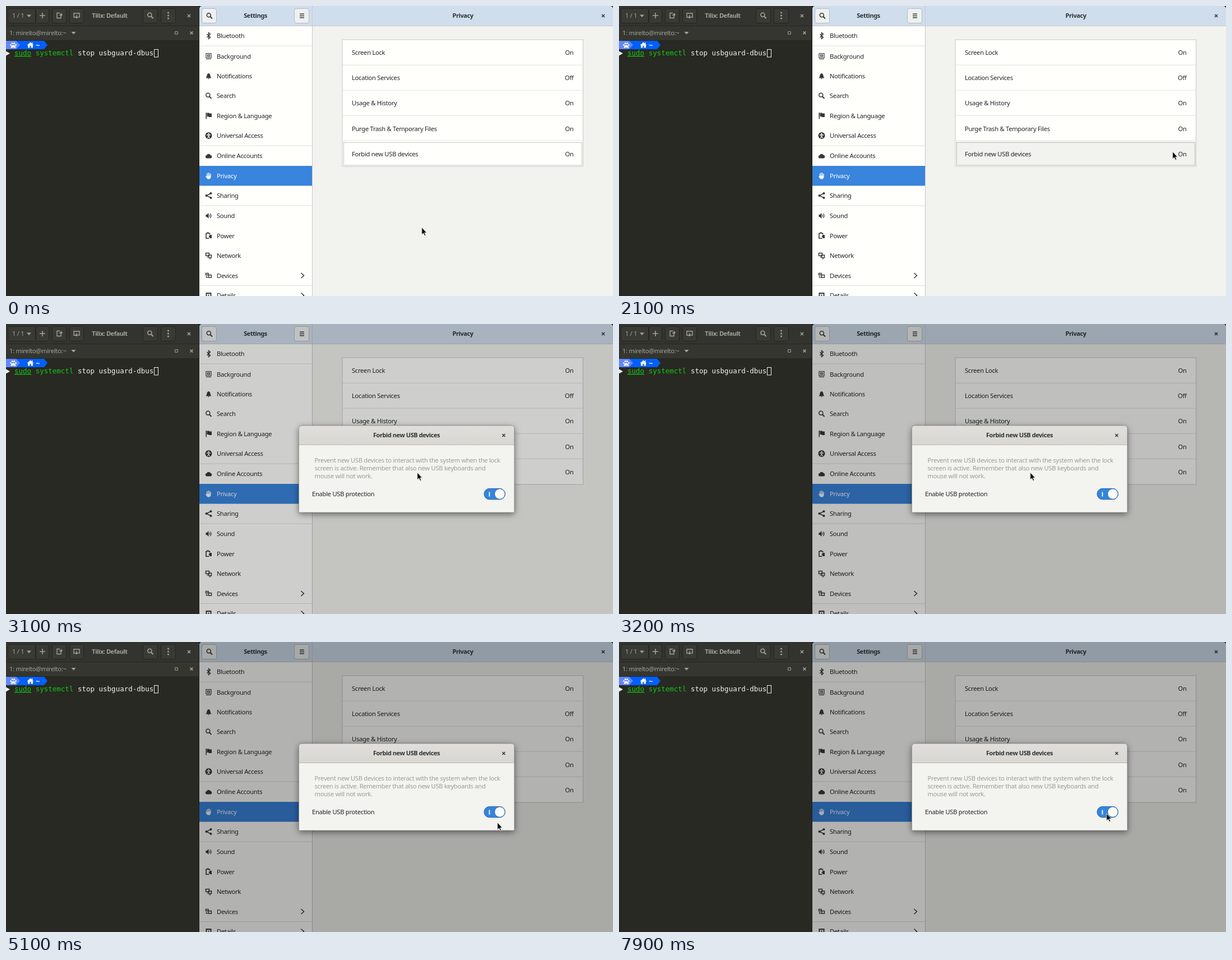
Animation of 1083 by 517 pixels, one loop 8000 ms. Source, as an HTML page:

```html
<!DOCTYPE html>
<html lang="en">
<head>
<meta charset="utf-8">
<title>USB protection settings</title>
<style>
  html, body { margin: 0; width: 100%; height: 100%; overflow: hidden; background: #282923; }
  svg { display: block; width: 100vw; height: 100vh; }
  text { font: 11.2px "Noto Sans", "Open Sans", sans-serif; letter-spacing: -.28px; fill: #222628; white-space: pre; }
  .title { font-weight: 700; font-size: 11px; letter-spacing: -.45px; text-anchor: middle; fill: #2e3436; }
  .end { text-anchor: end; }
  .dim { fill: #9b9d99; }
  .mono { font: 12.5px "DejaVu Sans Mono", monospace; letter-spacing: 0; fill: #f3f3ec; }
  .dark text { fill: #a3a39c; }
  .dark rect { fill: #3a3a35; stroke: #242420; }
  .ico { fill: currentColor; color: #343a3b; }
  .ln { fill: none; stroke: currentColor; stroke-width: 1.6; }
</style>
</head>
<body>
<svg viewBox="0 0 1083 517">
  <defs>
    <linearGradient id="bar" x2="0" y2="1"><stop stop-color="#e1dfdb"/><stop offset="1" stop-color="#d8d6d1"/></linearGradient>
    <filter id="shadow" x="-10%" y="-20%" width="120%" height="145%">
      <feDropShadow dx="0" dy="3" stdDeviation="6" flood-opacity=".5"/>
    </filter>
  </defs>

  <!-- terminal -->
  <rect width="345" height="517" fill="#282923"/>
  <rect width="345" height="35" fill="#33342f"/>
  <rect y="35" width="345" height="27" fill="#353630"/>
  <path d="M0 35.5H345M0 61.5H345" stroke="#262722"/>
  <g class="dark" id="termBar"></g>
  <path d="M18 62H68L74 69.5 68 77H18Z" fill="#005fff"/>
  <path d="M0 62H18L25 69.5 18 77H0Z" fill="#5f87ff"/>
  <g fill="#f3f3ec">
    <path d="M8.5 74.5C8.500 71 11 69.500 13 69.500S17.500 71 17.500 74.500C16 75.500 14.500 74 13 74S10 75.500 8.500 74.500Z"/>
    <circle cx="8.500" cy="69.500" r="1.500"/><circle cx="11.300" cy="66.500" r="1.600"/>
    <circle cx="14.800" cy="66.500" r="1.600"/><circle cx="17.500" cy="69.500" r="1.500"/>
    <path d="M37.500 70 43.500 64.500 46 66.800V65H47.500V68.200L49.500 70H48V74.500H44.500V71H42.500V74.500H39V70Z"/>
    <path d="M0 80.500 7 84.500 0 88.500Z"/>
  </g>
  <text class="mono" x="53" y="74" font-weight="700" style="font-weight:700">~</text>
  <text class="mono" x="15" y="88"><tspan fill="#14c714" text-decoration="underline">sudo</tspan><tspan fill="#14c714"> systemctl</tspan> stop usbguard-dbus</text>
  <rect x="264.500" y="77.500" width="7" height="13.500" fill="none" stroke="#f3f3ec"/>

  <!-- settings window -->
  <path d="M344 517V0H1083V517Z" fill="#1f201c"/>
  <path id="windowShape" d="M345 517V6Q345 0 351 0H1077Q1083 0 1083 6V517Z" fill="#f2f2ee"/>
  <path d="M345 35V6Q345 0 351 0H1077Q1083 0 1083 6V35Z" fill="#d0ddec"/>
  <rect x="345" y="36" width="201" height="481" fill="#fffffc"/>
  <path d="M345 35.500H1083M546.500 0V517" stroke="#c6c8c8"/>
  <g fill="#eff1f0" stroke="#b4b9bd">
    <rect x="349.500" y="4.500" width="26" height="26" rx="3.500"/>
    <rect x="514.500" y="4.500" width="26" height="26" rx="3.500"/>
  </g>
  <g id="windowBar"></g>
  <g id="sidebar"></g>
  <rect x="600" y="60" width="429.500" height="226" fill="#fffffc" stroke="#cbc8c3"/>
  <rect id="hover" x="600.500" y="241" width="428.500" height="44.500" fill="#f2f2ee"/>
  <g id="panel"></g>
  <rect id="focus" x="602.500" y="243.500" width="425" height="40.500" fill="none" stroke="#8b8e8c" stroke-dasharray="1 1"/>
  <path id="shade" d="M345 517V6Q345 0 351 0H1077Q1083 0 1083 6V517Z"/>

  <!-- dialog -->
  <g id="dialog">
    <path d="M522.500 336V187Q522.500 181 528.500 181H901Q907 181 907 187V336Z" fill="#f3f3ef" filter="url(#shadow)"/>
    <path d="M522.500 216V187Q522.500 181 528.500 181H901Q907 181 907 187V216Z" fill="url(#bar)"/>
    <path d="M522.500 215.500H907" stroke="#bdb8b2"/>
    <path d="M522.500 336V187Q522.500 181 528.500 181H901Q907 181 907 187V336Z" fill="none" stroke="#6e6e6a" stroke-width=".6"/>
    <g id="dialogText"></g>
    <rect id="track" x="853" y="293.300" width="37.500" height="19.500" rx="9.750"/>
    <path id="markOn" d="M862.500 299.500V307.500" stroke="#fff" stroke-width="1.800"/>
    <circle id="markOff" cx="880.700" cy="303.200" r="2.600" fill="none" stroke="#3a3f40" stroke-width="1.400"/>
    <circle id="knob" cy="303" r="9.300" fill="#fbfbf8"/>
  </g>
  <path id="pointer" d="M.8.8V13.600L3.700 11 5.900 15.600 7.900 14.700 5.800 10.200H9.600Z" fill="#0c0c0c" stroke="#f4f4f0" stroke-width=".8"/>
</svg>

<script>
const $ = id => document.getElementById(id);
const text = (x, y, str, cls = '') => `<text x="${x}" y="${y}" class="${cls}">${str}</text>`;
const icon = (x, y, body, color = '#343a3b') =>
  `<g class="ico" style="color:${color}" transform="translate(${x} ${y})">${body}</g>`;
const line = (d, width = 1.6) => `<path class="ln" d="${d}" style="stroke-width:${width}"/>`;
const solid = d => `<path d="${d}"/>`;
const dot = (x, y, r) => `<circle cx="${x}" cy="${y}" r="${r}"/>`;

const cross = line('M-2.500-2.500 2.500 2.500M2.500-2.500-2.500 2.500');
const lens = '<circle class="ln" cx="-1.200" cy="-1.200" r="3.500"/>' + line('M1.500 1.500 5 5', 2);
const caret = solid('M-4-2H4L0 2.500Z');
const chevron = line('M-2.500-4.500 2.500 0-2.500 4.500', 1.5);

// Terminal header
const gray = '#a3a39c';
const termButton = (x, w) => `<rect x="${x}.5" y="4.500" width="${w}" height="26" rx="3"/>`;
$('termBar').innerHTML =
  [[3, 49], [53, 23], [82, 25], [113, 25], [244, 26], [276, 26]].map(b => termButton(...b)).join('') +
  text(11, 21, '1 / 1') + icon(41, 17.5, caret, gray) +
  icon(65, 17, line('M-5 0H5M0-5V5'), gray) +
  icon(95, 17, line('M1-4.500H-4V4.500H3V1M0-1H4', 1.4) + solid('M2.500-5 6-1.500 2.500 2Z'), gray) +
  icon(126, 17, line('M-2 3H-5V-4H5V3H3', 1.4) + solid('M-3 2H3L0 5.500Z') + line('M0-1V3', 1.4), gray) +
  text(185, 21, 'Tilix: Default', 'title') +
  icon(257.500, 17, lens, gray) +
  icon(289.500, 17, dot(0, -5, 1.5) + dot(0, 0, 1.5) + dot(0, 5, 1.5), gray) +
  icon(326.500, 17.500, cross, gray) +
  text(6, 52, '1: mirelto@mirelto:~') + icon(120.500, 48, caret, gray) +
  icon(304, 48, line('M-2.300-2.300H2.300V2.300H-2.300Z', 1), gray) + icon(331, 48, cross, gray);

// Settings header
$('windowBar').innerHTML =
  icon(363, 17.500, lens) + icon(528, 17.500, line('M-4-3.200H4M0 0M-4 0H4M-4 3.200H4', 1.5)) +
  text(445, 21, 'Settings', 'title') + text(815, 21, 'Privacy', 'title') + icon(1065.500, 17.500, cross);

// Sidebar
const screens = line('M-5-4.500H1V0H-5ZM-3 2.500H-1', 1.5) + line('M0-1H5V3.500H0Z', 1.5) + line('M1 5.500H4', 1.3);
const rows = [
  ['Bluetooth', 53, line('M-3-3 3 3 0 5.500V-5.500L3-3-3 3', 1.4)],
  ['Background', 89.5, line('M-4.500-5H4.500V3H-4.500ZM-4.500 5H4.500', 1.2) + line('M-2 1V-3H2V1ZM-2-1H2', 1)],
  ['Notifications', 125, solid('M-5 3.500C-2.500 1.500-4-4 0-5 4-4 2.500 1.500 5 3.500ZM-1.500 4H1.500L0 5.500Z')],
  ['Search', 160, lens],
  ['Region &amp; Language', 195.5, solid('M-5-5.500H-3.500V6H-5ZM-3-5H1V-4H5.500V2.500H0V1.500H-3Z')],
  ['Universal Access', 231, dot(0, 0, 6) +
    '<g style="color:#fffffc"><circle cy="-3.300" r="1.200"/>' + line('M-3.500-1H3.500M0-1V1.500M-2 4.500 0 1 2 4.500', 1.3) + '</g>'],
  ['Online Accounts', 267, solid('M-3.500 4.500A2.800 2.800 0 0 1-3.500-1A4 4 0 0 1 3.500-1.200A2.900 2.900 0 0 1 3.500 4.500Z')],
  ['Privacy', 302.5, solid('M-3.500 0H4V3.500L2 6H-2L-5.500 1.500-4.500.500-3.500 1.500Z') + line('M-3-4V1M-.800-5.500V1M1.400-5V1M3.500-3.500V1', 1.3)],
  ['Sharing', 338, dot(-4, 0, 2) + dot(4, -4, 2) + dot(4, 4, 2) + line('M4-4-4 0 4 4', 1.4)],
  ['Sound', 374, solid('M-5-2H-3L0-5V5L-3 2H-5Z') + line('M1.500-2Q3 0 1.500 2M3-4Q6 0 3 4', 1.2)],
  ['Power', 409.5, line('M1 4.800H-4.500V-4H-2.500V-5.200H0V-4H2V-2', 1.6) + solid('M0 1 2.500-1.500H5.500V4.500H2.500Z')],
  ['Network', 445, screens],
  ['Devices', 480.5, line('M-5-4H-.500V-1H-5Z', 1.5) + line('M0-1H5V3.500H0ZM-4 1V3H-1', 1.4), true],
  ['Details', 516, line('M-4-4H4V4H-4Z', 2) + line('M0-2V3', 1.5), true]
];
$('sidebar').innerHTML =
  '<path d="M345 71H546M345 249H546M345 356H546M345 498.500H546" stroke="#deded9"/>' +
  '<rect x="345" y="285" width="201" height="35.500" fill="#3984dc"/>' +
  rows.map(([name, y, body, more]) => {
    const active = name === 'Privacy';
    const label = text(376, y + 4, name);
    return icon(361.5, y, body, active ? '#f4f8fc' : undefined) +
      (active ? label.replace('<text', '<text style="fill:#fff"') : label) +
      (more ? icon(529, y, chevron) : '');
  }).join('');

// Privacy list
const options = [['Screen Lock', 'On'], ['Location Services', 'Off'], ['Usage &amp; History', 'On'],
  ['Purge Trash &amp; Temporary Files', 'On'], ['Forbid new USB devices', 'On']];
$('panel').innerHTML = options.map(([name, value], i) => {
  const y = 87 + 45.2 * i;
  return (i ? `<path d="M600 ${60.2 + 45 * i}H1029" stroke="#e0e0db"/>` : '') +
    text(617, y, name) + text(1012.7, y, value, 'end');
}).join('');
const usbState = $('panel').lastElementChild;

$('dialogText').innerHTML =
  text(714.5, 202, 'Forbid new USB devices', 'title') + icon(888, 198.500, cross) +
  ['Prevent new USB devices to interact with the system when the lock',
    'screen is active. Remember that also new USB keyboards and',
    'mouse will not work.'].map((s, i) => text(550.5, 246.5 + 14.4 * i, s, 'dim')).join('') +
  text(546, 307, 'Enable USB protection');

// Pointer path: time, x, y
const path = [
  [0, 741, 394], [700, 741, 394], [1100, 633, 322], [1300, 646, 307],
  [1400, 646, 307], [1700, 770, 280], [2000, 960, 251], [2100, 987, 259], [2300, 733, 252],
  [2500, 733, 252], [2600, 733, 264], [3600, 733, 264], [3900, 777, 244], [4200, 618, 272], [4500, 681, 288],
  [4800, 785, 312], [5100, 876, 321], [5200, 881, 325], [5400, 871, 305],
  [5800, 871, 305], [6300, 1005, 271], [6600, 1005, 271], [6700, 1005, 272],
  [6900, 900, 318], [7100, 860, 311], [7200, 860, 311], [7400, 869, 305], [8000, 869, 305]
];
function pointerAt(t) {
  const i = path.findIndex(p => p[0] > t);
  const [t0, x0, y0] = path[i - 1], [t1, x1, y1] = path[i];
  const k = (t - t0) / (t1 - t0);
  return [x0 + (x1 - x0) * k, y0 + (y1 - y0) * k];
}

const show = (id, on) => { $(id).style.display = on ? '' : 'none'; };

function draw() {
  const t = Math.floor(performance.now() % 8000 / 100) * 100;
  const [x, y] = pointerAt(t);
  const open = t >= 2900;
  const enabled = t < 5800 || t >= 7900;
  const fade = Math.min(1, Math.max(0, (t - 2900) / 500));

  $('pointer').setAttribute('transform', `translate(${x} ${y})`);
  show('hover', !open && x > 600 && y > 241 && y < 285);
  show('focus', !open);
  show('dialog', open);
  $('shade').setAttribute('opacity', 0.3 * (1 - (1 - fade) ** 2));

  usbState.textContent = enabled ? 'On' : 'Off';
  $('track').setAttribute('fill', enabled ? '#3584dc' : '#dddcd7');
  $('track').setAttribute('stroke', enabled ? '#2363ad' : '#bfbbb5');
  $('knob').setAttribute('stroke', enabled ? '#2363ad' : '#bfbbb5');
  $('knob').setAttribute('cx', enabled ? 881 : 863);
  show('markOn', enabled);
  show('markOff', !enabled);
  requestAnimationFrame(draw);
}
draw();
</script>
</body>
</html>
```
